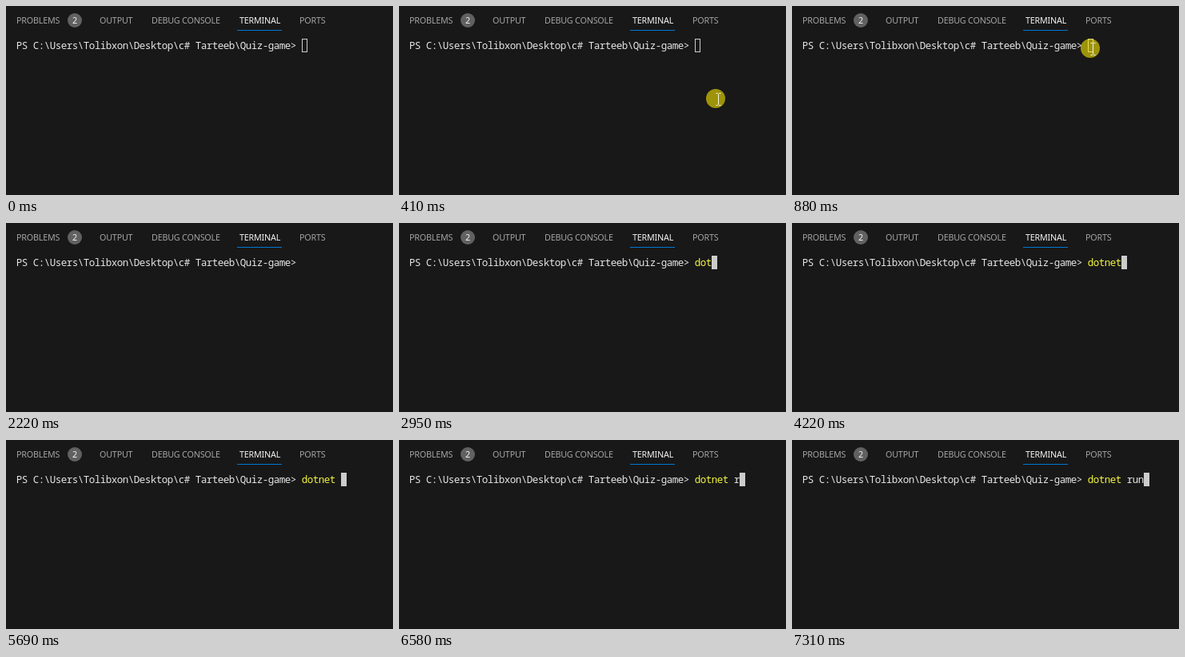
An HTML page for the animation above (7.99 s loop, 484 px wide and 237 px high).

```html
<!DOCTYPE html>
<html lang="en">
<head>
<meta charset="utf-8">
<title>Terminal</title>
<style>
  html, body { margin: 0; width: 100%; height: 100%; overflow: hidden; background: #181818; }
  svg { display: block; width: 484px; height: 237px; }
  .tabs { font: 10.75px "Noto Sans", "Open Sans", sans-serif; letter-spacing: -.2px; fill: #a4a4a4; }
  .tabs .on { fill: #f4f4f4; }
  .term { font: 12.5px "Noto Sans Mono", "DejaVu Sans Mono", monospace; letter-spacing: -.5px; fill: #e6e6e6; }
</style>
</head>
<body>
<svg viewBox="0 0 484 237">
  <rect width="484" height="237" fill="#181818"/>
  <g class="tabs">
    <text x="13" y="22">PROBLEMS</text>
    <circle cx="86" cy="18" r="9" fill="#616161"/>
    <text x="86" y="22" text-anchor="middle" class="on">2</text>
    <text x="117" y="22">OUTPUT</text>
    <text x="182" y="22">DEBUG CONSOLE</text>
    <text x="292" y="22" class="on">TERMINAL</text>
    <text x="367" y="22">PORTS</text>
  </g>
  <rect x="289" y="30" width="56" height="1" fill="#0078d4"/>
  <g class="term">
    <text x="12.75" y="54">PS C:\Users\Tolibxon\Desktop\c# Tarteeb\Quiz-game</text>
    <text id="mark" x="355.75" y="54">&gt;</text>
    <text id="cmd" x="369.75" y="54"></text>
    <text id="arg" x="418.75" y="54"></text>
  </g>
  <rect id="hollow" x="370.5" y="41.5" width="6" height="16" fill="none" stroke="#cccccc"/>
  <rect id="block" y="41" width="7" height="17" fill="#cccccc"/>
  <g id="mouse">
    <circle r="12" fill="#ffee00" fill-opacity=".58"/>
    <path d="M0.5 -6.5H2.5L3.5 -5.5L4.5 -6.5H6.5M3.5 -5.5V7.5M0.5 8.5H2.5L3.5 7.5L4.5 8.5H6.5" fill="none" stroke="#f4f4e4"/>
  </g>
</svg>
<script>
const LOOP = 7990, CELL = 7, START = 370;
const $ = id => document.getElementById(id);
const [mark, cmd, arg, hollow, block, mouse] =
  ["mark", "cmd", "arg", "hollow", "block", "mouse"].map($);

// time, typed text, cursor style
const typing = [
  [0, "", "hollow"], [950, "", "block"], [2220, "", ""],
  [2290, "d", "block"], [2550, "d", ""], [2620, "do", "block"],
  [2950, "dot", "block"], [3560, "dot", ""], [3630, "dotn", "block"],
  [3890, "dotn", ""], [3960, "dotne", "block"], [4220, "dotnet", "block"],
  [5690, "dotnet ", "block"], [6580, "dotnet r", "block"],
  [6910, "dotnet ru", "block"], [7240, "dotnet ru", ""], [7310, "dotnet run", "block"]
];

// time, pointer x, y
const pointer = [
  [0], [140, 417, 188], [210, 413, 172], [290, 405, 145], [360, 396, 116],
  [440, 387, 90], [520, 379, 70], [600, 374, 59], [680, 373, 55],
  [880, 373, 53], [950, 383, 63], [1020, 416, 94], [1090, 454, 130], [1160]
];

const at = (steps, t) => steps.findLast(s => s[0] <= t);
const show = (el, on) => el.setAttribute("visibility", on ? "visible" : "hidden");

function draw(t) {
  const [, text, cursor] = at(typing, t);
  const [, x, y] = at(pointer, t);
  const [name, rest = ""] = text.split(" ");
  const keyword = text === "do";

  mark.style.fill = keyword ? "#f14c4c" : "";
  cmd.style.fill = keyword ? "#23d18b" : "#f5f543";
  cmd.textContent = name;
  arg.textContent = rest;

  show(hollow, cursor === "hollow");
  show(block, cursor === "block");
  block.setAttribute("x", START + CELL * text.length);

  show(mouse, x !== undefined);
  if (x !== undefined) mouse.setAttribute("transform", `translate(${x} ${y})`);
}

const begin = performance.now();
function tick() {
  draw((performance.now() - begin) % LOOP);
  requestAnimationFrame(tick);
}
draw(0);
requestAnimationFrame(tick);
</script>
</body>
</html>
```
